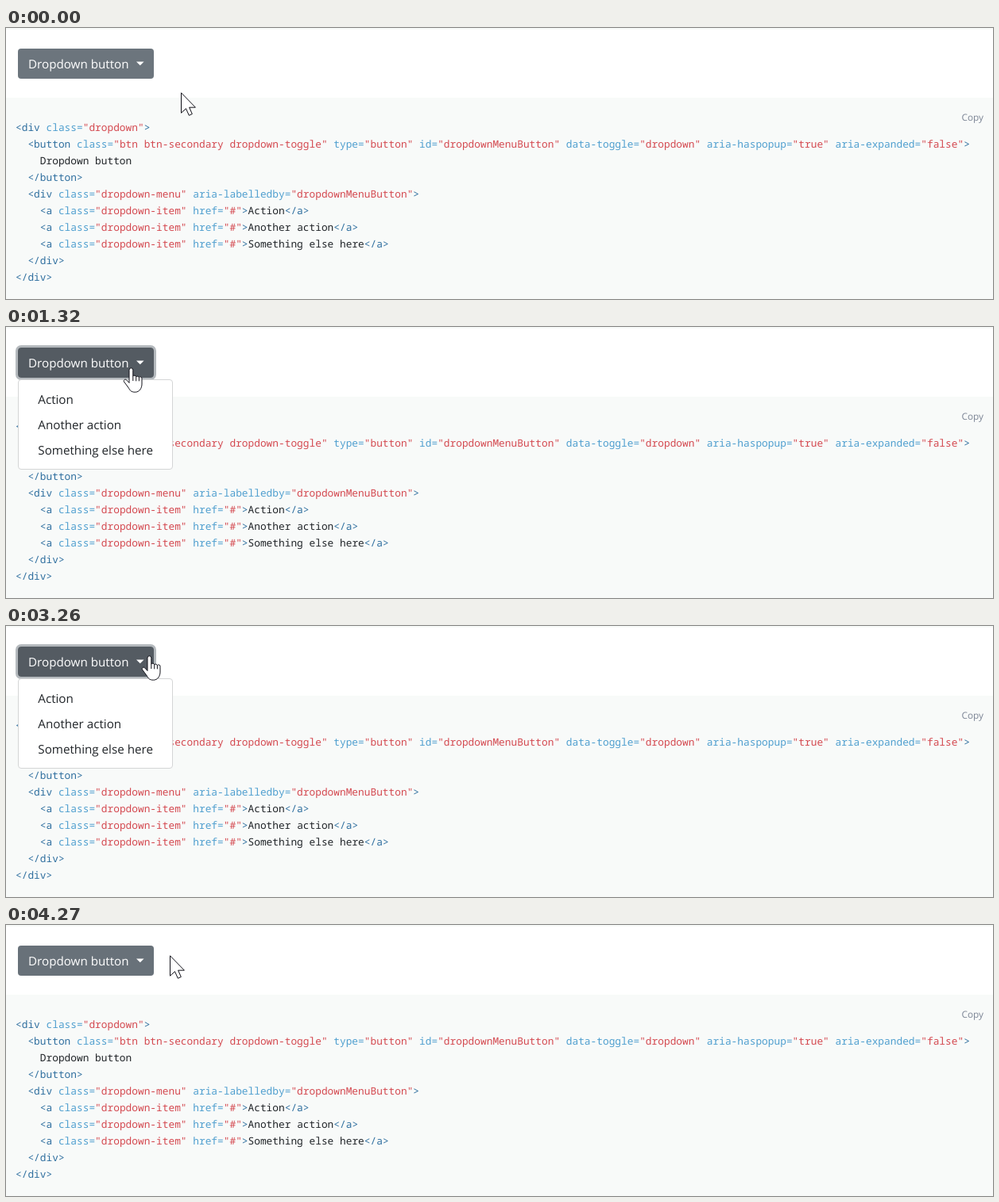
These frames come from a looping animation (1242 px wide and 342 px high, 4.35 s). An HTML page:

```html
<!DOCTYPE html>
<html lang="en">
<head>
<meta charset="utf-8">
<title>Dropdown button</title>
<style>
  html, body { margin: 0; width: 100%; height: 100%; overflow: hidden; background: #fff; }
  svg { display: block; width: 1242px; height: 342px; }
  text { white-space: pre; text-rendering: geometricPrecision; }
  .ui { font: 15.2px "Open Sans", "Noto Sans", sans-serif; fill: #212529; }
  .code { font: 12.83px "Noto Sans Mono", "DejaVu Sans Mono", monospace; fill: #212529; }
  .tag { fill: #2f6f9f; }
  .attr { fill: #4f9fcf; }
  .str { fill: #d44950; }
  #arrow, #hand { fill: #fff; stroke: #101018; stroke-width: 1; }
</style>
</head>
<body>
<svg viewBox="0 0 1242 342">
  <rect width="1242" height="2" fill="#f8faf9"/>
  <rect y="88" width="1242" height="254" fill="#f8faf9"/>
  <g id="code" class="code"></g>
  <text class="ui" x="1202.5" y="117" style="font-size:11.8px;fill:#7c8595">Copy</text>

  <rect id="ring" x="13.5" y="24.5" width="174" height="41" rx="5.5" fill="none" stroke="#828a91" stroke-width="3"/>
  <rect id="button" x="15" y="26" width="171" height="38" rx="4"/>
  <text class="ui" x="28" y="51" style="fill:#fff">Dropdown button</text>
  <path d="M164 42.5h9.6l-4.8 4.8z" fill="#fff"/>

  <g id="menu" class="ui">
    <rect x="15.5" y="66.5" width="194" height="113" rx="3.5" fill="#fff" stroke="#d4d5d6"/>
    <text x="40.3" y="97">Action</text>
    <text x="40.3" y="129">Another action</text>
    <text x="40.3" y="161">Something else here</text>
  </g>

  <!-- Both pointers have their hot spot at 0,0. -->
  <path id="arrow" d="M.5 .8V26.2L6.5 20.7 10.3 29.3 14.3 27.5 10.6 19.2H18.4Z"/>
  <path id="hand" d="M-2 19.5V3.2a2.4 2.4 0 0 1 4.8 0V11a2.2 2.2 0 0 1 3.9.8a2.2 2.2 0 0 1 3.7 1a2 2 0 0 1 3.6 1.6V21c0 5-3 10.2-8.5 10.2c-5 0-6.5-2.2-8-5L-8.5 18c-1-2 1.5-3.8 3-2.3zM2.8 11v6M6.7 11.8v5.5M10.4 12.8v4.5"/>
</svg>
<script>
const $ = id => document.getElementById(id);
const SVG = 'http://www.w3.org/2000/svg';
const LOOP = 4350, TICK = 1000 / 13, LEAD = 160;

const source = `<div class="dropdown">
  <button class="btn btn-secondary dropdown-toggle" type="button" id="dropdownMenuButton" data-toggle="dropdown" aria-haspopup="true" aria-expanded="false">
    Dropdown button
  </button>
  <div class="dropdown-menu" aria-labelledby="dropdownMenuButton">
    <a class="dropdown-item" href="#">Action</a>
    <a class="dropdown-item" href="#">Another action</a>
    <a class="dropdown-item" href="#">Something else here</a>
  </div>
</div>`;

function add(parent, name, attrs) {
  const el = document.createElementNS(SVG, name);
  for (const key in attrs) el.setAttribute(key, attrs[key]);
  return parent.appendChild(el);
}

source.split('\n').forEach((line, row) => {
  const text = add($('code'), 'text', { x: 12, y: 130 + row * 21 });
  for (const [token, tag, attr, str] of line.matchAll(/(<\/?\w+>?|>)|([\w-]+=)|("[^"]*")| +|\w+/g)) {
    const kind = tag ? 'tag' : attr ? 'attr' : str ? 'str' : 'plain';
    add(text, 'tspan', { class: kind }).textContent = token;
  }
});

const start = [220, 81];
const moves = [
  { from: -1, to: 5, at: [128, 36] },   // onto the button
  { from: 5, to: 7, at: [160, 56] },
  { from: 8, to: 10, at: [157, 51] },   // click
  { from: 26, to: 27, at: [154, 60] },
  { from: 27, to: 32, at: [128, 109] }, // down the menu
  { from: 33, to: 36, at: [145, 153] },
  { from: 37, to: 40, at: [180, 37] },  // back to the button
  { from: 46, to: 50, at: [206, 38] }   // away
];
const PRESS = 13, OPEN = 15, BLUR = 48, CLOSE = 52;
const normal = [108, 117, 125], hover = [90, 98, 104], active = [84, 91, 98];

function ease(tick, from, to) {
  const p = Math.min(1, Math.max(0, (tick - from) / (to - from)));
  return p * p * (3 - 2 * p);
}
const fade = (tick, from) => ease(tick, from, from + 2);
const mix = (a, b, p) => a.map((v, i) => v + (b[i] - v) * p);
const show = (id, on) => $(id).style.display = on ? '' : 'none';

function draw(time) {
  const tick = Math.floor((time - LEAD) / TICK);
  const [x, y] = moves.reduce((pos, m) => mix(pos, m.at, ease(tick, m.from, m.to)), start);

  let colour = mix(normal, hover, fade(tick, 1));
  colour = mix(colour, active, fade(tick, PRESS));
  colour = mix(colour, normal, fade(tick, CLOSE - 0.5));
  $('button').setAttribute('fill', `rgb(${colour.map(Math.round)})`);
  $('ring').setAttribute('opacity', 0.6 * (fade(tick, PRESS) - fade(tick, BLUR)));

  const open = tick >= OPEN && tick < CLOSE;
  const hand = y < 64 ? x < 186 : open && x < 210;
  show('menu', open);
  show('hand', hand);
  show('arrow', !hand);
  $(hand ? 'hand' : 'arrow').setAttribute('transform', `translate(${Math.round(x)} ${Math.round(y)})`);
}

const begin = performance.now();
function frame() {
  draw((performance.now() - begin) % LOOP);
  requestAnimationFrame(frame);
}
frame();
</script>
</body>
</html>
```
